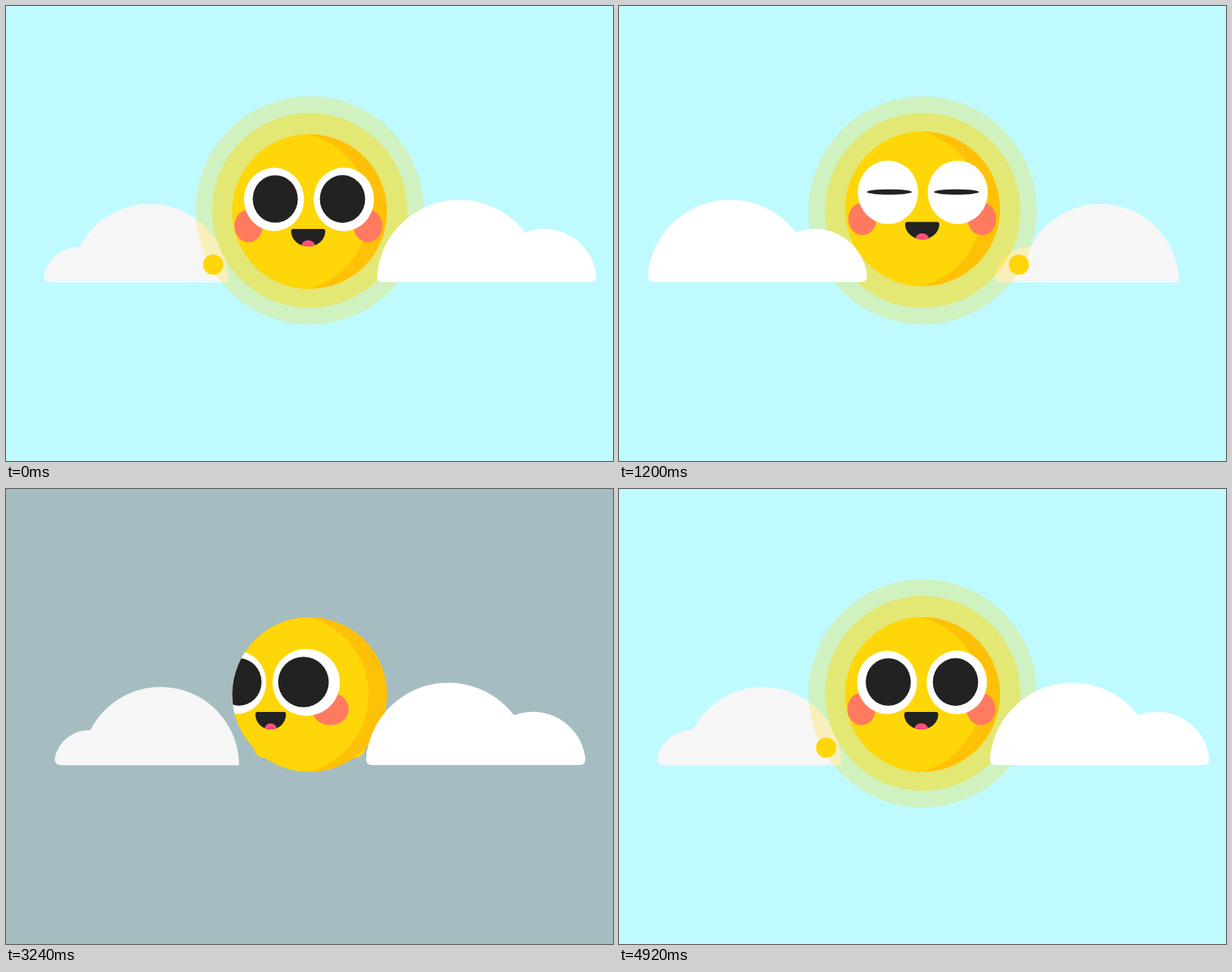
Animation, 800 px wide and 600 px high, one loop 5.2 s. Source, as an HTML page with a canvas:

```html
<!DOCTYPE html>
<html lang="en">
<head>
<meta charset="utf-8">
<title>Sun and clouds</title>
<style>
html, body { margin: 0; width: 100%; height: 100%; overflow: hidden; background: #bffaff; }
canvas { display: block; }
</style>
</head>
<body>
<canvas id="stage" width="800" height="600"></canvas>
<script>
const ctx = document.getElementById('stage').getContext('2d');
const LOOP = 5200, SECOND = 2480, STEP = 40;
const SUN = { x: 400.2, y: 271, r: 102 };
const YELLOW = '#ffd607';
const TURN = 268; // distance between the leaving and the arriving face

const backCloud = new Path2D('M58 364.3Q49.5 364 50 355A46 46 0 0 1 97 318A103.5 103.5 0 0 1 293 364.3Z');
const frontCloud = new Path2D('M497 364Q488.5 364 489 355A108.8 108.8 0 0 1 684 298.5A69.5 69.5 0 0 1 778 355Q778.5 364 770 364Z');
const mouth = new Path2D('M-19.5 294H19.5Q22.5 294 22.5 297A22.5 20 0 0 1-22.5 297Q-22.5 294-19.5 294Z');

const phase = (t, from, to) => Math.min(1, Math.max(0, (t - from) / (to - from)));

// Eased 0 to 1 between two times
const ease = (t, from, to) => (1 - Math.cos(Math.PI * phase(t, from, to))) / 2;

// 1, then down to 0 and later back up to 1
const dip = (t, down, gone, up, full) => 1 - ease(t, down, gone) + ease(t, up, full);

function steepInOut(u) {
  const k = 5.6;
  return u < 0.5 ? (2 * u) ** k / 2 : 1 - (2 - 2 * u) ** k / 2;
}

const mix = (a, b, u) => a.map((v, i) => Math.round(v + (b[i] - v) * u));

function ellipse(x, y, rx, ry, color) {
  ctx.fillStyle = color;
  ctx.beginPath();
  ctx.ellipse(x, y, rx, ry, 0, 0, 2 * Math.PI);
  ctx.fill();
}

const circle = (x, y, r, color) => ellipse(x, y, r, r, color);

function cloud(path, dx, color) {
  ctx.save();
  ctx.translate(dx, 0);
  ctx.fillStyle = color;
  ctx.fill(path);
  ctx.restore();
}

function face(shift, open) {
  const cx = 398.3 + shift;
  for (const side of [-1, 1]) {
    const x = cx + side * 78.7;
    const rx = Math.max(15, 27 - 0.105 * Math.abs(x - SUN.x));
    ellipse(x, 290, rx, 21.5, '#ff7a5e');
  }
  for (const side of [-1, 1]) {
    const x = cx + 0.9 + side * 46;
    const d = Math.abs(x - SUN.x);
    const rx = Math.max(45 - 0.115 * d, 34 + 0.054 * d);
    const ry = rx / 2 + 22;
    const squint = 1.7 + 0.04 * Math.abs(shift);
    ellipse(x, 255, rx, ry, '#fff');
    ellipse(x - side * squint, 254.5, rx * 0.75, ry * 0.75 * open, '#222');
  }
  ctx.save();
  ctx.translate(cx, 0);
  ctx.scale(Math.max(0.2, 1 - 4e-5 * (cx - SUN.x) ** 2), 1);
  ctx.fillStyle = '#222';
  ctx.fill(mouth);
  ctx.clip(mouth);
  ellipse(0, 316.5, 9, 7.5, '#ff4f7b');
  ctx.restore();
}

function sun(shift, open, bodyLift, faceLift) {
  ctx.save();
  ctx.translate(0, -bodyLift);
  circle(SUN.x, SUN.y, SUN.r, '#ffc107');
  ctx.beginPath();
  ctx.arc(SUN.x, SUN.y, SUN.r, 0, 2 * Math.PI);
  ctx.clip();
  circle(373, SUN.y, 105, YELLOW);
  ctx.translate(0, bodyLift - faceLift);
  face(shift, open);
  face(shift + TURN, open);
  ctx.restore();
}

function draw(time) {
  const back = time >= SECOND;
  const t = back ? time - SECOND : time;
  const toward = v => back ? 1 - v : v;

  const slide = toward(steepInOut(phase(t, 0, 1095)));
  // A quick turn that settles slowly
  const spin = toward(0.75 * ease(t, 454, 603) + 0.25 * ease(t, 560, 1150));
  const dusk = ease(t, 340, 595) - ease(t, 595, 1100);
  const outer = 95 + 55.5 * dip(t, 475, 585, 860, 1060);
  const inner = 95 + 33.5 * dip(t, 515, 600, 980, 1180);
  const reach = 60 + 67 * dip(t, 455, 545, 860, 1060);
  const open = 0.11 + 0.89 * dip(t, 1120, 1200, 2275, 2365);

  // Three happy hops, the face slightly ahead of the body
  const hop = (from, height) =>
    height * Math.sin(3 * Math.PI * phase(t, from, from + 1040)) ** 2;

  const glow = mix([255, 214, 7], [224, 190, 7], dusk);
  ctx.fillStyle = `rgb(${mix([191, 250, 255], [157, 170, 173], dusk)})`;
  ctx.fillRect(0, 0, 800, 600);
  cloud(backCloud, 445 * slide, '#f6f6f6');
  circle(SUN.x, 269.5, outer, `rgba(${glow},.25)`);
  circle(SUN.x, 269.5, inner, `rgba(${glow},.41)`);
  circle(400 - reach, 341, 13.3, YELLOW);
  circle(400 + reach, 341, 13.3, YELLOW);
  sun(-266.7 * spin, open, hop(1120, 8), hop(1095, 14));
  cloud(frontCloud, -451 * slide, '#fff');
}

const start = performance.now();
function tick() {
  const time = (performance.now() - start) % LOOP;
  draw(Math.floor(time / STEP) * STEP);
  requestAnimationFrame(tick);
}
tick();
</script>
</body>
</html>
```
